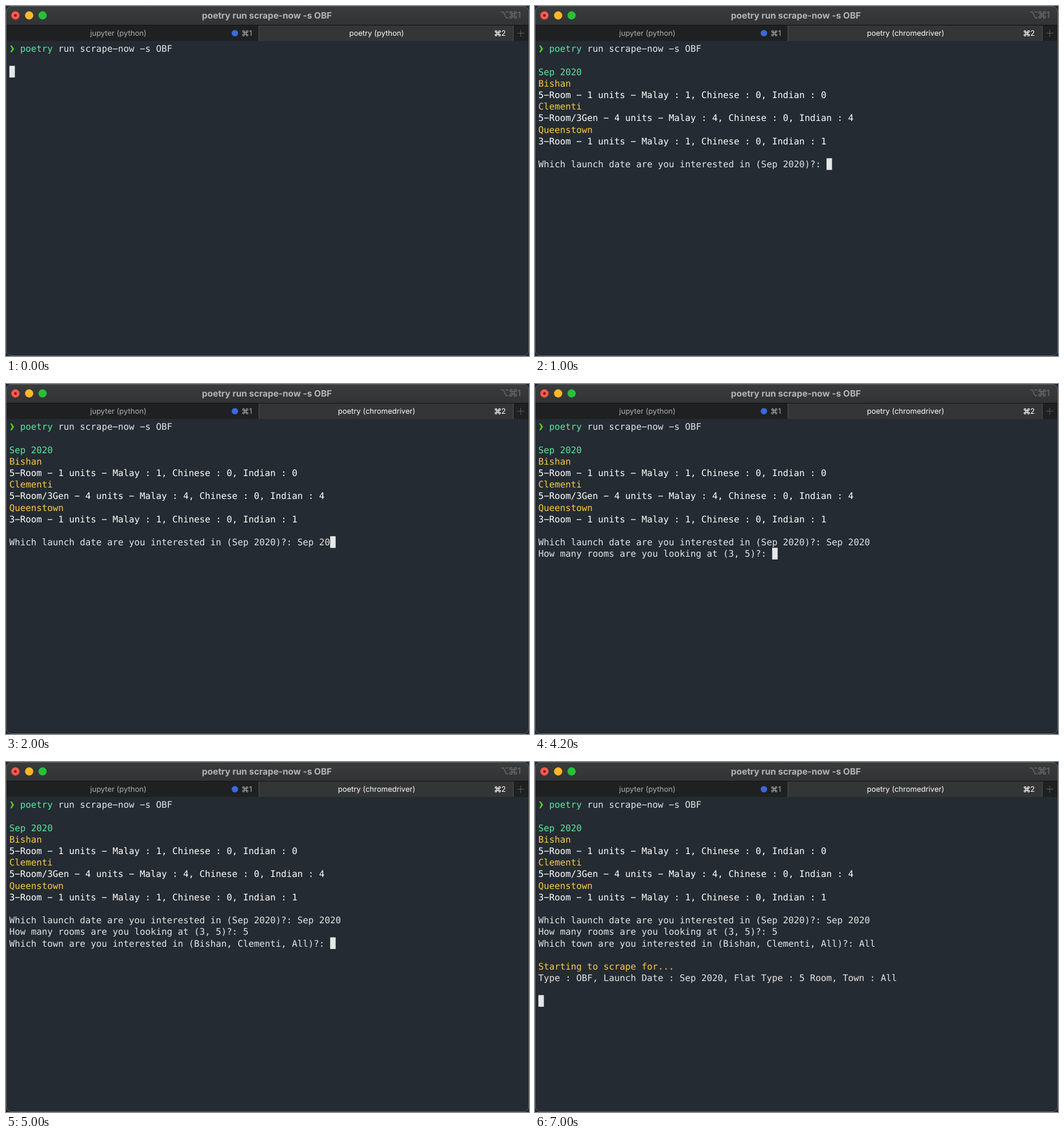
An HTML page that plays this animation: 915x612 px, repeating every 8 s.

```html
<!DOCTYPE html>
<html lang="en">
<head>
<meta charset="utf-8">
<title>Terminal session</title>
<style>
  html, body { margin: 0; width: 100%; height: 100%; overflow: hidden; background: #17283c; }
  svg { display: block; width: 915px; height: 612px; }
  text { white-space: pre; text-rendering: geometricPrecision; }
  .ui { font: 13px Inter, sans-serif; }
  .mid { text-anchor: middle; }
  #term { font: 15.8px "DejaVu Sans Mono", "Liberation Mono", monospace; }
</style>
</head>
<body>
<svg viewBox="0 0 915 612">
  <defs>
    <clipPath id="win"><rect width="915" height="612" rx="10"/></clipPath>
    <linearGradient id="bar" x2="0" y2="1">
      <stop stop-color="#3a3b3c"/><stop offset="1" stop-color="#323334"/>
    </linearGradient>
    <path id="cmd" fill="none" d="M-2-2H2V2H-2ZM-2-2H-4A2 2 0 1 1-2-4ZM2-2V-4A2 2 0 1 1 4-2ZM2 2H4A2 2 0 1 1 2 4ZM-2 2V4A2 2 0 1 1-4 2Z"/>
  </defs>
  <g clip-path="url(#win)">
    <rect width="915" height="612" fill="#242b32"/>
    <rect width="915" height="33" fill="url(#bar)"/>
    <rect y="33" width="915" height="28" fill="#1f2021"/>
    <rect y="33" width="915" height="1" fill="#101112"/>
    <rect x="443" y="34" width="444" height="27" fill="#343536"/>
    <path d="M442.5 34V61M887.5 34V61" stroke="#515253"/>
    <path d="M894.5 47.5H907M900.5 41.5V54" stroke="#5b5c5d"/>
  </g>
  <circle cx="16.5" cy="16.5" r="7.2" fill="#ff5a52"/>
  <circle cx="16.5" cy="16.5" r="2.3" fill="#7d0d08"/>
  <circle cx="40.5" cy="16.5" r="7.2" fill="#fdb927"/>
  <circle cx="64" cy="16.5" r="7.2" fill="#25c138"/>
  <text class="ui mid" x="456.5" y="21.5" fill="#b3b4b5" style="font-size:15.4px;font-weight:700">poetry run scrape-now -s OBF</text>
  <g stroke="#68696a" stroke-width="1.5" fill="none">
    <path d="M866 10.5H870.3L875 20.5H879M873.5 10.5H879"/>
    <use href="#cmd" transform="translate(887.2 15.5) scale(.97)"/>
  </g>
  <text class="ui" x="894.5" y="20.5" fill="#68696a" style="font-size:15.4px;font-weight:500">1</text>

  <text class="ui mid" x="196.5" y="52.3" fill="#b0b1b2">jupyter (python)</text>
  <circle cx="400.5" cy="47.5" r="5.6" fill="#3b69dc"/>
  <use href="#cmd" transform="translate(418.6 47.7) scale(.78)" stroke="#b0b1b2" stroke-width="1.4"/>
  <text class="ui" x="425.3" y="52.3" fill="#b0b1b2">1</text>
  <text class="ui mid" id="tab" x="648.3" y="52.3" fill="#fff"></text>
  <use href="#cmd" transform="translate(860.4 47.7) scale(.78)" stroke="#fff" stroke-width="1.6"/>
  <text class="ui" x="866.6" y="52.3" fill="#fff" font-weight="500">2</text>

  <path d="M7.4 69H10L14.2 75L10 81H7.4L10.6 75Z" fill="#58c81e"/>
  <g id="term"></g>
  <rect id="cursor" width="9.6" height="20.4" fill="#e6e7e7"/>
  <rect x=".5" y=".5" width="914" height="611" rx="9.5" fill="none" stroke="#5c6064"/>
</svg>
<script>
const LOOP = 8000, LEFT = 5.7, COL = 9.512, ROW = 20.2;
const GREEN = '#5be7a1', GOLD = '#f9cc42', WHITE = '#fff', PLAIN = '#e4e6e7';
const $ = id => document.getElementById(id);

// start ms, row, column, colour, text
const lines = [
  [0, 0, 2, GREEN, 'poetry'],
  [0, 0, 9, PLAIN, 'run scrape-now -s OBF'],
  [1000, 2, 0, GREEN, 'Sep 2020'],
  [1000, 3, 0, GOLD, 'Bishan'],
  [1000, 4, 0, WHITE, '5-Room - 1 units - Malay : 1, Chinese : 0, Indian : 0'],
  [1000, 5, 0, GOLD, 'Clementi'],
  [1000, 6, 0, WHITE, '5-Room/3Gen - 4 units - Malay : 4, Chinese : 0, Indian : 4'],
  [1000, 7, 0, GOLD, 'Queenstown'],
  [1000, 8, 0, WHITE, '3-Room - 1 units - Malay : 1, Chinese : 0, Indian : 1'],
  [1000, 10, 0, PLAIN, 'Which launch date are you interested in (Sep 2020)?: '],
  [2000, 10, 53, PLAIN, 'Sep 20'],
  [3000, 10, 59, PLAIN, '20'],
  [3000, 11, 0, PLAIN, 'How many rooms are you looking at (3, 5)?: '],
  [5000, 11, 43, PLAIN, '5'],
  [5000, 12, 0, PLAIN, 'Which town are you interested in (Bishan, Clementi, All)?: '],
  [7000, 12, 59, PLAIN, 'All'],
  [7000, 14, 0, GOLD, 'Starting to scrape for...'],
  [7000, 15, 0, PLAIN, 'Type : OBF, Launch Date : Sep 2020, Flat Type : 5 Room, Town : All']
];

// start ms, row, column
const stops = [
  [0, 2, 0], [1000, 10, 53], [2000, 10, 59],
  [3000, 11, 43], [5000, 12, 59], [7000, 17, 0]
];

const nodes = lines.map(([start, row, col, fill, str]) => {
  const el = document.createElementNS('http://www.w3.org/2000/svg', 'text');
  el.setAttribute('x', LEFT + col * COL);
  el.setAttribute('y', 80.2 + row * ROW);
  el.setAttribute('fill', fill);
  el.textContent = str.replace(/-/g, '\u2212'); // wide terminal dash
  $('term').append(el);
  return { el, start };
});

function draw(t) {
  for (const { el, start } of nodes) el.style.display = t >= start ? '' : 'none';
  const [, row, col] = stops.filter(s => s[0] <= t).pop();
  $('cursor').setAttribute('x', LEFT + .2 + col * COL);
  $('cursor').setAttribute('y', 64.2 + row * ROW);
  $('tab').textContent = t < 1000 ? 'poetry (python)' : 'poetry (chromedriver)';
}

const begin = performance.now();
function tick() {
  draw((performance.now() - begin) % LOOP);
  requestAnimationFrame(tick);
}
tick();
</script>
</body>
</html>
```
